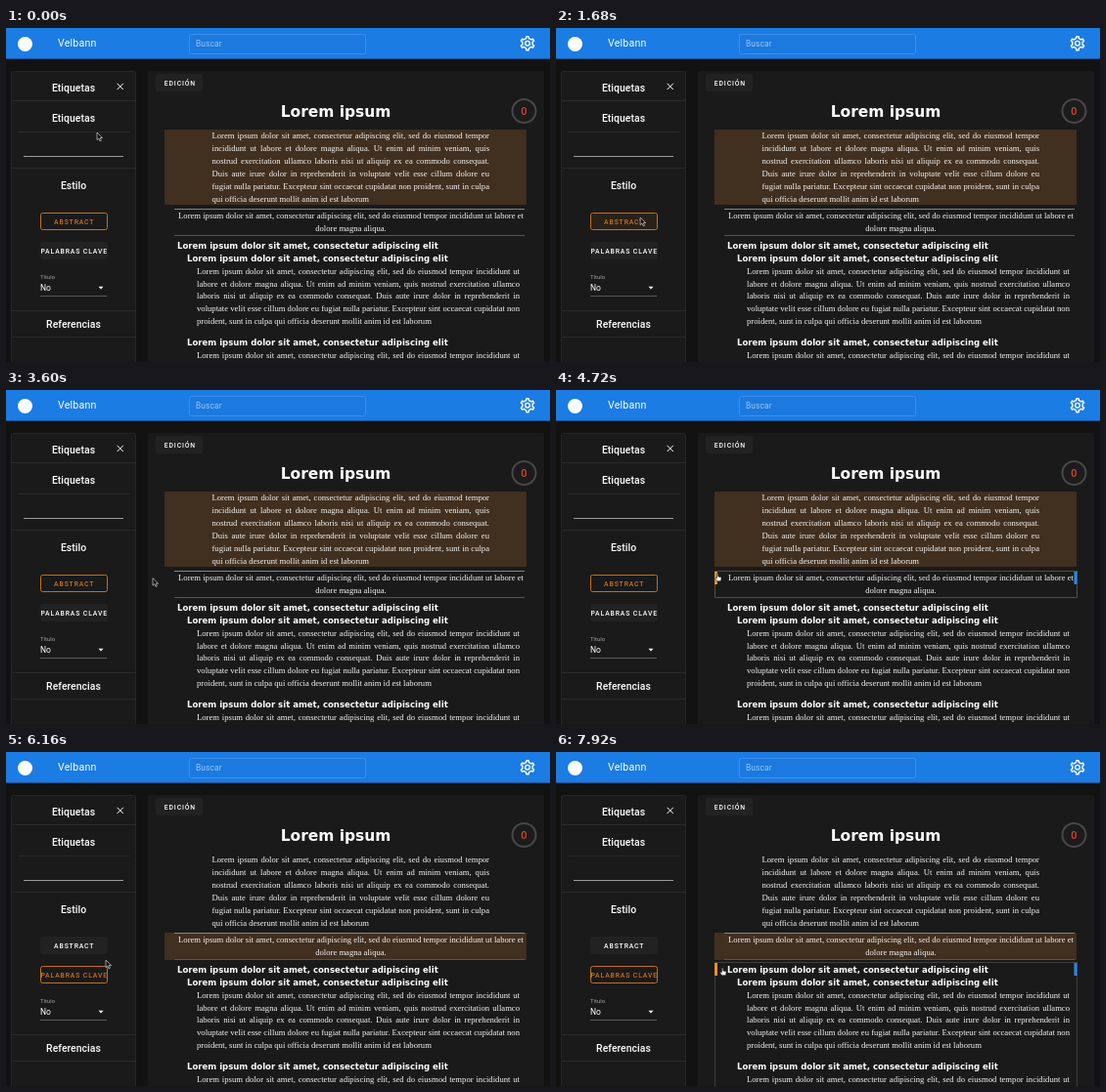
These frames come from a looping animation (556 px wide and 342 px high, 8 s). An HTML page:

```html
<!DOCTYPE html>
<html lang="es">
<head>
<meta charset="utf-8">
<title>Editor</title>
<style>
html, body { margin: 0; width: 100%; height: 100%; overflow: hidden; background: #121212; }
svg { display: block; width: 556px; height: 342px; }
text { fill: #fff; white-space: pre; }
.ui { font-family: Roboto, sans-serif; }
.head { font: 500 10.4px Roboto, sans-serif; letter-spacing: .05px; text-anchor: middle; }
.btn { font: 500 6.8px Roboto, sans-serif; letter-spacing: .88px; }
.bold { font: bold 8.54px "DejaVu Sans", sans-serif; }
.body { font: 8.63px "Liberation Serif", serif; fill: #f6f6f6; }
.rule { stroke: #2a2a2a; }
</style>
</head>
<body>
<svg id="stage" viewBox="0 0 556 342" xmlns="http://www.w3.org/2000/svg">
  <rect width="556" height="342" fill="#121212"/>
  <rect width="556" height="31.6" fill="#1b7ce4"/>

  <circle cx="19.5" cy="16.5" r="7.5" fill="#fff"/>
  <text class="ui" x="53" y="19.4" font-size="10.6" letter-spacing=".2">Velbann</text>
  <rect x="187.5" y="6.5" width="180" height="20" rx="2" fill="#1b79df" stroke="#3f90ea"/>
  <text class="ui" x="194" y="19.2" font-size="8.3" letter-spacing=".15" style="fill:#9cc6f5">Buscar</text>
  <g id="gear" transform="translate(533 15.7)" fill="none" stroke="#fff" stroke-width="1.4" stroke-linejoin="round"></g>

  <g id="sidebar">
    <rect x="5.5" y="44.5" width="127" height="310" rx="2" fill="#1a1a1a" stroke="#262626"/>
    <path class="rule" d="M6 74.5H133M12 106.5H126M6 143.5H133M6 289.5H133M6 316.5H133"/>
    <path d="M18 131.5H120" stroke="#9c9c9c"/>
    <path d="M113.6 56.8l6.2 6.2m0-6.2l-6.2 6.2" stroke="#fff"/>
    <text class="head" x="69" y="65">Etiquetas</text>
    <text class="head" x="69" y="96.3">Etiquetas</text>
    <text class="head" x="69" y="165">Estilo</text>
    <text class="head" x="69" y="306.5">Referencias</text>
    <g id="styleButtons"></g>
    <text class="ui" x="35" y="257.3" font-size="6" style="fill:#a0a0a0">Título</text>
    <text class="ui" x="35" y="268.8" font-size="8.5">No</text>
    <path d="M94.5 264.8h5l-2.5 2.6z" fill="#fff"/>
    <path d="M35 274.5H103" stroke="#5a5a5a"/>
  </g>

  <rect x="145" y="44" width="405" height="310" rx="2" fill="#1a1a1a"/>
  <rect x="153" y="47" width="48" height="18" rx="2" fill="#222"/>
  <text class="btn" x="161.8" y="58.8">EDICIÓN</text>
  <circle cx="529.5" cy="85" r="12" fill="#1c1c1c" stroke="#484848" stroke-width="2"/>
  <text class="ui" x="529.5" y="89" font-size="11" font-weight="500" text-anchor="middle" style="fill:#cf4630">0</text>

  <rect id="abstractMark" x="162" y="104" width="370" height="77" fill="#412f1f"/>
  <rect id="keysMark" x="162" y="185" width="370" height="28" fill="#412f1f"/>
  <path d="M172 185.5H530" stroke="#858585"/>
  <path d="M172 212.5H530" stroke="#555"/>
  <g id="doc"></g>
  <g id="keysHover"></g>
  <g id="sectionHover"></g>

  <path id="arrow" d="M0 0V7.6L1.8 6L3 8.8L4.4 8.2L3.2 5.5H5.6Z" fill="#111" stroke="#d0d0d0" stroke-width=".7" stroke-linejoin="round"/>
  <path id="hand" d="M-1.6 -3.6q.8 -.8 1.4 0V-.9L2.4 -.4Q3.3 0 3 1.2L2.4 3.8H-1.5L-3.4 .8Q-2.9 -.2 -1.6 .8Z" fill="#fff" stroke="#222" stroke-width=".7" stroke-linejoin="round"/>
</svg>
<script>
const LOOP = 8000, STEP = 80;
const $ = id => document.getElementById(id);

function add(parent, tag, attrs, content = "") {
  const el = document.createElementNS("http://www.w3.org/2000/svg", tag);
  for (const key in attrs) el.setAttribute(key, attrs[key]);
  el.textContent = content;
  return parent.appendChild(el);
}

function drawGear() {
  const teeth = 6, points = [];
  for (let i = 0; i < teeth; i++) {
    for (const [offset, r] of [[-.25, 5.3], [-.16, 7.1], [.16, 7.1], [.25, 5.3]]) {
      const a = (i + offset) * 2 * Math.PI / teeth + Math.PI / 2;
      points.push(`${(r * Math.cos(a)).toFixed(2)},${(r * Math.sin(a)).toFixed(2)}`);
    }
  }
  add($("gear"), "polygon", { points: points.join(" ") });
  add($("gear"), "circle", { r: 2.3 });
}

function styleButton(label, y) {
  const g = $("styleButtons");
  const box = add(g, "rect", { x: 35.5, y: y + .5, width: 68, height: 17, rx: 2 });
  const text = add(g, "text", { class: "btn", x: 69.7, y: y + 11.6, "text-anchor": "middle" }, label);
  return (active, hover) => {
    box.setAttribute("fill", active ? (hover ? "#2a2119" : "#1a1a1a") : "#222");
    box.setAttribute("stroke", active ? "#c4701f" : "#222");
    text.style.fill = active ? "#d0721f" : "#fff";
  };
}

// Spread the words of a line over the column width.
function justify(el, width) {
  const gaps = el.textContent.split(" ").length - 1;
  el.style.wordSpacing = (width - el.getComputedTextLength()) / gaps + "px";
}

function paragraph(lines, x, y, width, open = false) {
  lines.forEach((line, i) => {
    const el = add($("doc"), "text", { class: "body", x, y: y + i * 12.9 }, line);
    if (open || i < lines.length - 1) justify(el, width);
  });
}

function handles(id, y, height, stroke) {
  const g = $(id);
  add(g, "rect", { x: 162.5, y: y - .5, width: 370, height, fill: "none", stroke });
  add(g, "rect", { x: 162, y, width: 3, height: 13, fill: "#e8902e" });
  add(g, "rect", { x: 529.5, y, width: 3, height: 13, fill: "#2487f0" });
}

function drawDocument() {
  const lorem = "Lorem ipsum dolor sit amet, consectetur adipiscing elit";
  const first = lorem + ", sed do eiusmod tempor";
  const doc = $("doc");
  add(doc, "text", { class: "bold", x: 337, y: 91.3, "text-anchor": "middle", style: "font-size:15.45px" }, "Lorem ipsum");
  paragraph([
    first,
    "incididunt ut labore et dolore magna aliqua. Ut enim ad minim veniam, quis",
    "nostrud exercitation ullamco laboris nisi ut aliquip ex ea commodo consequat.",
    "Duis aute irure dolor in reprehenderit in voluptate velit esse cillum dolore eu",
    "fugiat nulla pariatur. Excepteur sint occaecat cupidatat non proident, sunt in culpa",
    "qui officia deserunt mollit anim id est laborum"
  ], 210.5, 113.2, 283.5);
  [first + " incididunt ut labore et", "dolore magna aliqua."].forEach((line, i) =>
    add(doc, "text", { class: "body", x: 352.5, y: 195 + i * 12.9, "text-anchor": "middle" }, line));
  for (const [x, y] of [[175, 226], [185, 239], [185, 325]]) {
    add(doc, "text", { class: "bold", x, y }, lorem);
  }
  const opening = first + " incididunt ut";
  paragraph([
    opening,
    "labore et dolore magna aliqua. Ut enim ad minim veniam, quis nostrud exercitation ullamco",
    "laboris nisi ut aliquip ex ea commodo consequat. Duis aute irure dolor in reprehenderit in",
    "voluptate velit esse cillum dolore eu fugiat nulla pariatur. Excepteur sint occaecat cupidatat non",
    "proident, sunt in culpa qui officia deserunt mollit anim id est laborum"
  ], 195, 251.6, 330);
  paragraph([opening], 195, 337.6, 330, true);
}

// Pointer stops: time, x, y
const path = [
  [0, 93, 107], [800, 111, 185], [1120, 111, 185], [1700, 86, 194], [2240, 76, 183],
  [2640, 76, 183], [3440, 150, 192.6], [4160, 150, 192.6], [4720, 166, 192], [5120, 166, 192],
  [6000, 102, 213], [6240, 102, 213], [6560, 88, 225], [6960, 88, 225], [7760, 171, 225], [8000, 171, 225]
];

function pointerAt(t) {
  const i = path.findIndex(p => p[0] > t);
  const [t0, x0, y0] = path[i - 1], [t1, x1, y1] = path[i];
  const k = (t - t0) / (t1 - t0), e = k * k * (3 - 2 * k);
  return [x0 + (x1 - x0) * e, y0 + (y1 - y0) * e];
}

const show = (id, on) => $(id).setAttribute("visibility", on ? "visible" : "hidden");
const between = (t, a, b) => t >= a && t < b;

function render(t) {
  const [x, y] = pointerAt(t);
  const keysHover = between(t, 4560, 5280), sectionHover = t >= 7600;
  const picked = t >= 4880, keysActive = t >= 5120;
  show("abstractMark", !picked);
  show("keysMark", picked);
  show("keysHover", keysHover);
  show("sectionHover", sectionHover);
  setAbstract(!keysActive, between(t, 1440, 2400));
  setKeys(keysActive, between(t, 6320, 7040));
  const pointing = keysHover || sectionHover;
  show("hand", pointing);
  show("arrow", !pointing);
  $(pointing ? "hand" : "arrow").setAttribute("transform", `translate(${x.toFixed(1)} ${y.toFixed(1)})`);
}

drawGear();
drawDocument();
const setAbstract = styleButton("ABSTRACT", 189);
const setKeys = styleButton("PALABRAS CLAVE", 219);
handles("keysHover", 186, 27, "#5a4a3a");
handles("sectionHover", 216, 140, "#404040");

const start = performance.now();
function tick() {
  const t = (performance.now() - start) % LOOP;
  render(Math.floor(t / STEP) * STEP);
  requestAnimationFrame(tick);
}
tick();
</script>
</body>
</html>
```
